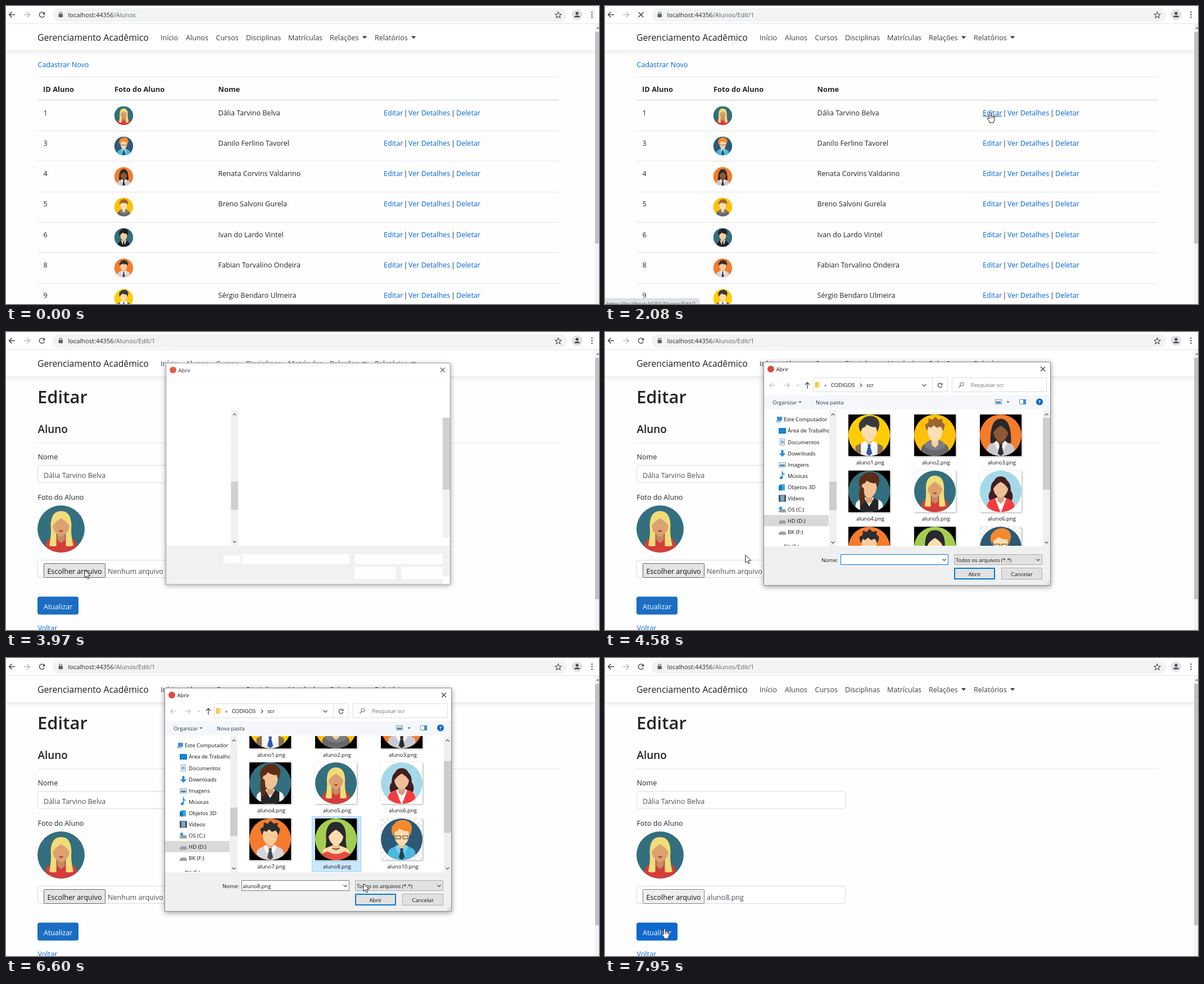
These frames come from a looping animation (1055 by 531 pixels, 8 s). An HTML page with a canvas:

```html
<!DOCTYPE html>
<html lang="pt">
<head>
<meta charset="utf-8">
<title>Gerenciamento Acadêmico</title>
<style>
html, body { margin: 0; width: 100%; height: 100%; overflow: hidden; background: #fff; }
canvas { display: block; }
</style>
</head>
<body>
<canvas id="stage" width="1055" height="531"></canvas>
<script>
const ctx = document.getElementById('stage').getContext('2d');
const LOOP = 8000, BODY = 12.55, SMALL = 9.5, INK = '#212529', LINK = '#0366d6';
const students = [
  [1, 5, 'Dália Tarvino Belva'], [3, 10, 'Danilo Ferlino Tavorel'], [4, 3, 'Renata Corvins Valdarino'],
  [5, 2, 'Breno Salvoni Gurela'], [6, 9, 'Ivan do Lardo Vintel'], [8, 7, 'Fabian Torvalino Ondeira'],
  [9, 1, 'Sérgio Bendaro Ulmeira']
];

// Time, x and y of the pointer's hot spot.
const pointerPath = [
  [0, 1015, 545], [640, 1015, 545], [860, 711, 376], [1060, 711, 376], [1260, 722, 352], [1800, 685, 190],
  [2240, 685, 190], [2960, 140, 424], [4370, 140, 424], [5120, 709, 284], [5190, 709, 284], [5520, 708, 320],
  [5655, 708, 320], [5660, 760, 394], [5860, 806, 398], [6200, 592, 335], [6330, 592, 335],
  [6580, 636, 402], [6650, 636, 402], [6950, 657, 430], [7420, 657, 430], [7930, 106, 482], [8000, 106, 482]
];

// Avatar parts in a 100 x 100 box.
const parts = {
  disc: 'M50 0A50 50 0 0 1 50 100A50 50 0 0 1 50 0Z',
  body: 'M17 100V84Q17 73 31 69L42 65H58L69 69Q83 73 83 84V100Z',
  neck: 'M42 55H58V73L50 80L42 73Z',
  head: 'M32 42Q32 21 50 21Q68 21 68 42Q66 61 50 66Q34 61 32 42Z',
  short: 'M29 42Q20 22 33 12Q43 1 59 4Q77 10 74 28L70 42L66 30Q56 32 44 24Q40 32 34 32Z',
  spiky: 'M30 40L26 25L34 20L35 9L44 13L51 5L58 12L68 10L68 19L74 25L70 40L64 29L54 32L48 26L40 32L35 29Z',
  long: 'M25 85Q30 62 28 42Q29 12 50 12Q71 12 72 42Q70 62 76 85Q68 88 60 86V58H40V86Q32 88 25 85Z',
  wide: 'M22 86Q28 62 26 42Q27 8 50 8Q73 8 74 42Q72 62 80 86Q66 92 50 88Q34 92 22 86Z',
  bob: 'M25 68Q24 10 50 10Q76 10 75 68Q64 74 50 68Q36 74 25 68Z',
  curls: 'M23 72Q18 58 26 48Q25 20 50 20Q75 20 74 48Q82 58 77 72Q78 83 66 80L58 62H42L34 80Q22 83 23 72Z',
  tail: 'M30 38Q22 55 30 84L40 76L37 42Z',
  fringe: 'M30 49Q30 14 50 14Q70 14 70 49Q66 36 50 27Q34 36 30 49Z',
  tie: 'M46 72H54L53 78L57 94L50 100L43 94L47 78Z',
  collar: 'M40 63L50 76L60 63L66 68L58 84L50 76L42 84L34 68Z',
  jacket: 'M17 100V84Q18 73 36 66L49 100ZM83 100V84Q82 73 64 66L51 100Z',
  vest: 'M28 100V71L38 66L50 86L62 66L72 71V100Z',
  top: 'M17 100V84L30 79Q50 92 70 79L83 84V100Z',
  straps: 'M17 100V76L30 69V100ZM83 100V76L70 69V100Z',
  hood: 'M25 77Q28 64 41 61Q50 82 59 61Q72 64 75 77Q50 96 25 77Z',
  lips: 'M45 54Q50 51 55 54Q50 59 45 54Z',
  glasses: 'M34 41H48V50H34ZM52 41H66V50H52ZM48 44H52V45H48ZM36 43V48H46V43ZM54 43V48H64V43Z',
  choker: 'M41 71Q50 75 59 71V73Q50 77 41 73Z'
};
for (const name in parts) parts[name] = new Path2D(parts[name]);

const avatars = {
  1: '#ffcd05 body#f4f4f4 straps#8a6f52 neck#eac28c head#fbdcae short#39393d collar#ffffff tie#2d5ba8',
  2: '#ffc107 body#65676b neck#ecc694 head#fadfb2 hood#7c7e82 neck#f3d19f head#fadfb2 spiky#9d6532',
  3: '#f47c2c bob#29282b body#c9cad0 neck#754326 head#8f5838 fringe#29282b collar#f1f1f3 tie#2b2c31',
  4: '#336f7e body#f4f4f4 vest#252429 neck#d9a071 head#f2c295 short#5b2d17 tail#5b2d17',
  5: '#336f7e body#d43d3a long#f1dc78 neck#c88b63 head#dca171 fringe#f1dc78 lips#c4383b',
  6: '#a5d9e9 curls#431d20 body#ffffff jacket#f33c3f neck#d6a17d head#eec09a fringe#431d20',
  7: '#f47c2c body#d5d5da neck#e0ae7c head#f7cc9c spiky#2d2c30 collar#f5f5f7 tie#45454b',
  8: '#a4cd50 wide#29282d body#fbdcae top#e54c3f neck#eac28c head#fbdcae fringe#29282d choker#343339',
  9: '#336f7e body#ffffff jacket#222226 neck#e3b07e head#f6cb9b short#202023 tie#222226',
  10: '#2d5878 body#4ab9dd neck#ecc694 head#fbdcae short#f58a2c glasses#8b6b4a collar#79d0ea tie#244157'
};

let time, pointer, modal;

function text(str, x, cy, size = BODY, color = INK, weight = 400, align = 'left') {
  ctx.font = `${weight} ${size}px "Open Sans", sans-serif`;
  ctx.fillStyle = color;
  ctx.textAlign = align;
  ctx.fillText(str, x, cy + size * 0.36);
  return ctx.measureText(str).width;
}

function box(x, y, w, h, fill, border, radius = 0) {
  ctx.beginPath();
  ctx.roundRect(border ? x + .5 : x, border ? y + .5 : y, border ? w - 1 : w, border ? h - 1 : h, radius);
  if (fill) { ctx.fillStyle = fill; ctx.fill(); }
  if (border) { ctx.strokeStyle = border; ctx.lineWidth = 1; ctx.stroke(); }
}

function stroke(path, color, width = 1) {
  ctx.strokeStyle = color;
  ctx.lineWidth = width;
  ctx.stroke(new Path2D(path));
}

function shape(path, color) {
  ctx.fillStyle = color;
  ctx.fill(new Path2D(path));
}

function dot(x, y, r, color) {
  ctx.beginPath();
  ctx.arc(x, y, r, 0, 7);
  ctx.fillStyle = color;
  ctx.fill();
}

const chevron = (x, y, dir = 1, color = '#555', size = 3) =>
  stroke(`M${x - size} ${y - dir * size / 2}L${x} ${y + dir * size / 2}L${x + size} ${y - dir * size / 2}`, color, 1.2);
const caret = (x, y, r, color = '#343a40') => shape(`M${x - r} ${y - r / 2}h${2 * r}l${-r} ${r}Z`, color);
const inside = (x, y, w, h) => pointer.x >= x && pointer.x <= x + w && pointer.y >= y && pointer.y <= y + h;

function clipped(x, y, w, h, draw) {
  ctx.save();
  ctx.beginPath();
  ctx.rect(x, y, w, h);
  ctx.clip();
  draw();
  ctx.restore();
}

function avatar(id, x, y, size) {
  const [background, ...layers] = avatars[id].split(' ');
  ctx.save();
  ctx.translate(x, y);
  ctx.scale(size / 100, size / 100);
  ctx.clip(parts.disc);
  ctx.fillStyle = background;
  ctx.fillRect(0, 0, 100, 100);
  for (const layer of layers) {
    const [name, color] = layer.split('#');
    ctx.fillStyle = '#' + color;
    ctx.fill(parts[name], 'evenodd');
  }
  ctx.restore();
}

function link(label, x, cy, target) {
  ctx.font = `400 ${BODY}px "Open Sans", sans-serif`;
  const width = ctx.measureText(label).width;
  const over = !modal && inside(x, cy - 8, width, 17);
  text(label, x, cy, BODY, over ? '#0056b3' : LINK);
  if (over) {
    box(x, cy + 6, width, 1, '#0056b3');
    pointer.hand = true;
    pointer.target = target;
  }
}

function reloadIcon(x, y, r, color) {
  ctx.beginPath();
  ctx.arc(x, y, r, 0.3, 5.5);
  ctx.strokeStyle = color;
  ctx.lineWidth = 1.4;
  ctx.stroke();
  shape(`M${x + r + .6} ${y - r - .6}v${r}h${-r}Z`, color);
}

function browserBar() {
  box(0, 0, 1055, 31, '#fff');
  box(0, 31, 1055, 1, '#e3e5e8');
  box(83, 4, 915, 24, '#f1f3f4', null, 12);
  stroke('M16 15.5H6M10.5 10.5L5.5 15.5L10.5 20.5', '#45484c', 1.5);
  stroke('M32 15.5H42M37.5 10.5L42.5 15.5L37.5 20.5', '#b9bbbe', 1.5);
  if (time >= 2010 && time < 2220) stroke('M59.5 11L68.5 20M68.5 11L59.5 20', '#45484c', 1.6);
  else reloadIcon(64, 15.5, 4.6, '#45484c');
  box(93.5, 14, 7.5, 6, '#5f6368', null, 1);
  stroke('M95 14.5V13Q95 11 97.2 11Q99.4 11 99.4 13V14.5', '#5f6368', 1.2);
  const host = text('localhost:44356', 110.5, 16, 11.1, '#26282c');
  text('/Alunos' + (time >= 2010 ? '/Edit/1' : ''), 110.5 + host, 16, 11.1, '#5f6368');
  stroke('M982.5 10.5l1.5 3.7 4 .3-3 2.6 1 3.9-3.5-2.1-3.5 2.1 1-3.9-3-2.6 4-.3Z', '#45484c', 1.1);
  dot(1016, 15.5, 9.5, '#dee1e6');
  dot(1016, 13, 2.6, '#45484c');
  shape('M1011 20Q1011 17 1016 17Q1021 17 1021 20Z', '#45484c');
  for (const y of [11, 15.5, 20]) dot(1042.5, y, 1.2, '#45484c');
}

function siteHeader(scrollEnd) {
  ctx.save();
  ctx.shadowColor = 'rgba(0,0,0,.08)';
  ctx.shadowBlur = 9;
  ctx.shadowOffsetY = 3;
  box(0, 32, 1048, 47, '#fff');
  ctx.restore();
  box(0, 79, 1048, 1, '#e7e8ea');
  text('Gerenciamento Acadêmico', 56, 56.5, 15.75, '#1c1e21');
  const items = [['Início', 275], ['Alunos', 320], ['Cursos', 373.5], ['Disciplinas', 427], ['Matrículas', 502],
    ['Relações', 576], ['Relatórios', 656]];
  for (const [label, x] of items) text(label, x, 56.5, BODY, '#3a3d41');
  caret(638, 56, 4.3);
  caret(725, 56, 4.3);
  box(1048, 32, 7, 499, '#f1f1f1');
  box(1048, 46, 7, scrollEnd - 46, '#c1c1c1');
  caret(1053, 39, -3, '#777');
}

function listPage() {
  siteHeader(423);
  link('Cadastrar Novo', 56.5, 104, 'Create');
  box(56, 126, 927, 1, '#e1e4e8');
  box(56, 167, 927, 1.5, '#d9dde1');
  [['ID Aluno', 66], ['Foto do Aluno', 193], ['Nome', 377.5]].forEach(([label, x]) => text(label, x, 148, 12.9, INK, 700));
  students.forEach(([id, face, name], i) => {
    const y = 190 + 54.3 * i;
    text(id, 66.5, y);
    avatar(face, 192.7, y - 11.5, 33.5);
    text(name, 377.5, y);
    link('Editar', 672, y, 'Edit/' + id);
    text('|', 711, y, BODY, INK, 400, 'center');
    link('Ver Detalhes', 716, y, 'Details/' + id);
    text('|', 795.5, y, BODY, INK, 400, 'center');
    link('Deletar', 801, y, 'Delete/' + id);
    box(56, Math.round(y + 32), 927, 1, '#e0e3e7');
  });
  if (pointer.target) {
    box(-5, 521, 173.5, 20, '#dee1e6', '#cfd2d6', 4);
    text('https://localhost:44356/Alunos/' + pointer.target, 162, 531, 9.2, '#5f6368', 400, 'right');
  }
}

function editPage() {
  siteHeader(476);
  text('Editar', 56, 116, 31, INK, 600);
  text('Aluno', 56.5, 173, 18.9, INK, 600);
  box(56, 197, 928, 1, '#e6e6e6');
  text('Nome', 56.5, 222);
  box(56, 237, 372, 32, '#fff', '#d5dade', 4);
  text(students[0][2], 67, 255, BODY, '#495057');
  text('Foto do Aluno', 56.5, 294);
  avatar(5, 56, 309, 84);
  box(56, 406, 372, 32, '#fff', '#d5dade', 4);
  const overFile = modal || inside(67, 412, 110, 26);
  box(67, 412, 110, 26, overFile ? '#e5e5e5' : '#efefef', overFile ? '#666' : '#808080', 1);
  text('Escolher arquivo', 73.5, 426, BODY, '#111');
  text(time >= 7480 ? 'aluno8.png' : 'Nenhum arquivo selecionado', 181, 426.5, BODY, '#495057');
  const overSave = !modal && inside(56, 471, 73, 32);
  if (overSave) pointer.hand = true;
  box(56, 471.5, 73, 32, overSave ? '#0d69cc' : '#1b6ec2', null, 4);
  text('Atualizar', 67, 489, BODY, '#fff');
  link('Voltar', 56.5, 527);
}

function scrollBar(x, top, bottom, thumbTop, thumbHeight) {
  box(x, top, 13, bottom - top, '#f0f0f0');
  box(x, thumbTop, 13, thumbHeight, '#cdcdcd');
  chevron(x + 6.5, top + 8, -1);
  chevron(x + 6.5, bottom - 7);
}

function sideBar() {
  const labels = ['Este Computador', 'Área de Trabalho', 'Documentos', 'Downloads', 'Imagens', 'Músicas',
    'Objetos 3D', 'Vídeos', 'OS (C:)', 'HD (D:)', 'BK (F:)', 'BK (F:)'];
  box(283, 326, 115, 20, '#d9d9d9');
  labels.forEach((label, i) => {
    const y = i < 11 ? 156 + 20.05 * i : 383, x = i % 11 ? 325 : 318;
    text(label, x, y, SMALL, '#111');
    if (i === 0) { box(306, y - 5, 9, 7, '#3a93dc'); box(304, y + 2, 9, 3, '#b7bdc4'); }
    if (i === 1) box(309, y - 5, 13, 10, '#1586dc', '#0c69b5');
    if (i === 2) { box(311, y - 6, 9, 12, '#fff', '#8b98a5'); box(313, y - 3, 5, 6, '#8fb4cf'); }
    if (i === 3) shape(`M313.5 ${y - 6}h4v6h4l-6 6l-6-6h4Z`, '#2a8ad8');
    if (i === 4) { box(309, y - 4, 13, 9, '#d9ecf7', '#93a4b0'); box(311, y, 9, 3, '#4b87a8'); }
    if (i === 5) { dot(313.5, y + 3.5, 2.5, '#1586dc'); stroke(`M315.5 ${y + 3}v-9q1 3 4 4`, '#1586dc', 1.6); }
    if (i === 6) { box(311, y - 5, 9, 11, '#35a9dc'); box(309, y - 3, 6, 9, '#177cb6'); }
    if (i === 7) { box(309, y - 6, 13, 12, '#46515f'); box(312, y - 5, 7, 10, '#7ba6cf'); }
    if (i > 7 && i < 11) {
      shape(`M309 ${y + 2}l3-3h8l2 3v3h-13Z`, '#9b9fa3');
      if (i === 8) box(310, y - 5, 5, 5, '#1f9ee8');
      dot(319.5, y + 3.5, 1, '#4fd46b');
    }
  });
}

function thumbnail(id, x, y) {
  ctx.save();
  ctx.shadowColor = 'rgba(0,0,0,.35)';
  ctx.shadowBlur = 3;
  ctx.shadowOffsetX = ctx.shadowOffsetY = 1;
  box(x, y, 74, 74, [5, 6, 10].includes(id) ? '#fff' : '#000');
  ctx.restore();
  if (id === 10) {
    for (let k = 0; k < 225; k += 2) box(x + k % 15 * 4.93, y + Math.floor(k / 15) * 4.93, 4.93, 4.93, '#ededed');
  }
  avatar(id, x, y, 74);
}

function fileGrid() {
  const scroll = time >= 5660 ? 60.5 : 0;
  [1, 2, 3, 4, 5, 6, 7, 8, 10].forEach((id, i) => {
    const x = 427 + 117 * (i % 3), y = Math.round(143.3 + 99.6 * Math.floor(i / 3) - scroll);
    if (id === 8 && time >= 6270) box(x + 117 - 117, y, 88, 99, '#cce8ff', '#99d1ff');
    else if (inside(x, y, 88, 98) && pointer.y < 381) box(x, y, 88, 99, '#e5f3ff');
    thumbnail(id, x + 6, y + 4);
    text(`aluno${id}.png`, x + 45, y + 90, SMALL, '#111', 400, 'center');
  });
}

function button(label, x, isDefault) {
  const over = inside(x, 420, 73, 21);
  box(x, 420, 73, 21, over ? '#e5f1fb' : '#e1e1e1', over || isDefault ? '#0078d7' : '#adadad');
  if (isDefault) box(x + 1, 421, 71, 19, null, '#0078d7');
  text(label, x + 36.5, 431.5, SMALL, '#111', 400, 'center');
}

function dialogContent() {
  stroke('M303 95H293M297 91L293 95L297 99', '#bfbfbf', 1.2);
  stroke('M318 95H328M324 91L328 95L324 99', '#bfbfbf', 1.2);
  chevron(343, 95, 1, '#bbb', 2);
  stroke('M360 101V90M356 94L360 90L364 94', '#444', 1.3);
  box(370, 81, 240, 26, '#fff', '#dcdcdc');
  box(374, 89, 8, 10, '#ffd866');
  box(374, 89, 3, 10, '#eebd45');
  text('«', 390, 95, SMALL, '#444');
  text('CODIGOS', 402, 95, SMALL, '#111');
  stroke('M454 92L457 95L454 98', '#444', 1.2);
  text('scr', 465, 95, SMALL, '#111');
  chevron(568, 95, 1, '#444', 3.5);
  box(582, 82, 1, 25, '#dcdcdc');
  reloadIcon(596, 95, 3.8, '#555');
  box(617, 81, 169, 26, '#fff', '#dcdcdc');
  stroke('M629 99L633 95M638 93A3 3 0 1 1 632 93A3 3 0 1 1 638 93', '#777', 1.1);
  text('Pesquisar scr', 651, 95, SMALL, '#6d6d6d');
  box(283, 112, 509, 26, '#f5f7fa');
  text('Organizar', 298, 125.5, SMALL, '#1e395b');
  caret(347, 125, 2.5, '#1e395b');
  text('Nova pasta', 375, 125.5, SMALL, '#1e395b');
  box(694, 120, 12, 9, '#d9ecf7', '#8394a2');
  box(696, 124, 8, 3, '#3f7f9e');
  caret(717, 125, 2.5, '#333');
  box(737, 120, 12, 9, '#fff', '#6d8aa5');
  box(744, 120, 5, 9, '#3b8fd6');
  dot(773, 124.5, 6, '#0067c0');
  text('?', 773, 124.5, 9.5, '#fff', 700, 'center');
  clipped(283, 139, 116, 242, sideBar);
  scrollBar(399, 139, 382, 266.5, 51);
  clipped(413, 139, 366, 242, fileGrid);
  scrollBar(779, 139, 382, time >= 5660 ? 183.5 : 153, 128);
  box(283, 382, 509, 69, '#f0f0f0');
  text('Nome:', 414.5, 406.5, SMALL, '#111', 400, 'right');
  const chosen = time >= 6270;
  box(419, 396, 192, 19, '#fff', chosen ? '#7a7a7a' : '#0078d7');
  if (chosen) text('aluno8.png', 421.5, 407, SMALL, '#111');
  chevron(603.5, 406, 1, '#444');
  const overFilter = inside(621, 403, 157, 12);
  box(621, 396, 157, 19, overFilter ? '#e5f1fb' : '#e1e1e1', overFilter ? '#0078d7' : '#adadad');
  text('Todos os arquivos (*.*)', 624, 406.5, 9.35, '#111');
  chevron(770.5, 406, 1, '#444');
  button('Abrir', 621, true);
  button('Cancelar', 705, false);
  for (let i = 0; i < 3; i++) {
    for (let j = 0; j < 3 - i; j++) dot(790 - i * 2.5, 449 - j * 2.5, .7, '#a5a5a5');
  }
}

function dialogSkeleton() {
  scrollBar(399, 138, 382, 266.5, 51);
  box(779, 152, 13, 215, '#f0f0f0');
  box(779, 152, 13, 129, '#cdcdcd');
  box(283, 382, 509, 69, '#f0f0f0');
  box(386, 399, 30, 14, '#fff');
  box(419, 397, 193, 18, '#fff');
  box(621, 397, 158, 18, '#fff');
  box(621, 420, 74, 22, '#fff');
  box(705, 420, 74, 22, '#fff');
  box(779, 437, 13, 14, '#fff');
}

// The shadow is kept outside the window so that it does not tint a half-opaque body.
function dialogShadow() {
  ctx.save();
  ctx.beginPath();
  ctx.rect(200, 0, 700, 531);
  ctx.rect(282, 53, 511, 399);
  ctx.clip('evenodd');
  ctx.shadowColor = 'rgba(0,0,0,.4)';
  ctx.shadowBlur = 9;
  ctx.shadowOffsetY = 2;
  box(282, 53, 511, 399, '#fff');
  ctx.restore();
}

function dialog() {
  const opening = Math.min((time - 3830) / 200, 1), closing = Math.max((time - 7480) / 80, 0);
  const shown = 1 - (1 - opening) ** 2 - closing;
  if (shown <= 0) return;
  const zoom = 0.9 + 0.1 * shown;
  ctx.save();
  ctx.translate(537.5, 252.5);
  ctx.scale(zoom, zoom);
  ctx.translate(-537.5, -252.5);
  ctx.globalAlpha = shown;
  dialogShadow();
  box(282, 53, 511, 399, '#fff');
  dot(295, 66, 6, '#dd4b3e');
  text('Abrir', 304.5, 66.5, SMALL, '#111');
  stroke('M775 62L783 70M783 62L775 70', '#333', 1.1);
  if (time >= 4100) dialogContent();
  else dialogSkeleton();
  box(282, 53, 511, 399, null, '#8a8a8a');
  ctx.restore();
}

function movePointer() {
  const next = Math.max(1, pointerPath.findIndex(key => key[0] > time));
  const [t0, x0, y0] = pointerPath[next - 1], [t1, x1, y1] = pointerPath[next];
  const u = (time - t0) / (t1 - t0), eased = u * u * (3 - 2 * u);
  pointer = { x: x0 + (x1 - x0) * eased, y: y0 + (y1 - y0) * eased, hand: false, target: '' };
}

function drawPointer() {
  const path = new Path2D(pointer.hand
    ? 'M-1.5 1Q0-1 1.5 1V6Q3 5 4 6.3Q5.5 5.5 6.3 7Q8 6.3 8 8V12Q8 14 6.5 16V18H-1V16Q-4 12-5 10Q-4 8.5-1.5 11Z'
    : 'M0 0V14L3.2 11L5.5 16L7.6 15L5.4 10.2H10Z');
  ctx.save();
  ctx.translate(pointer.x, pointer.y);
  ctx.lineJoin = 'round';
  ctx.fillStyle = '#fff';
  ctx.fill(path);
  ctx.strokeStyle = '#222';
  ctx.lineWidth = 1;
  ctx.stroke(path);
  if (pointer.hand) stroke('M1.5 6V10M4 7V10M6.3 7.5V10', '#222', .8);
  ctx.restore();
}

function frame(now) {
  time = now % LOOP;
  modal = time >= 3830 && time < 7480;
  movePointer();
  box(0, 0, 1055, 531, '#fefefe');
  if (time < 2220) listPage();
  else editPage();
  browserBar();
  if (time >= 3830) dialog();
  drawPointer();
  requestAnimationFrame(frame);
}
requestAnimationFrame(frame);
</script>
</body>
</html>
```
